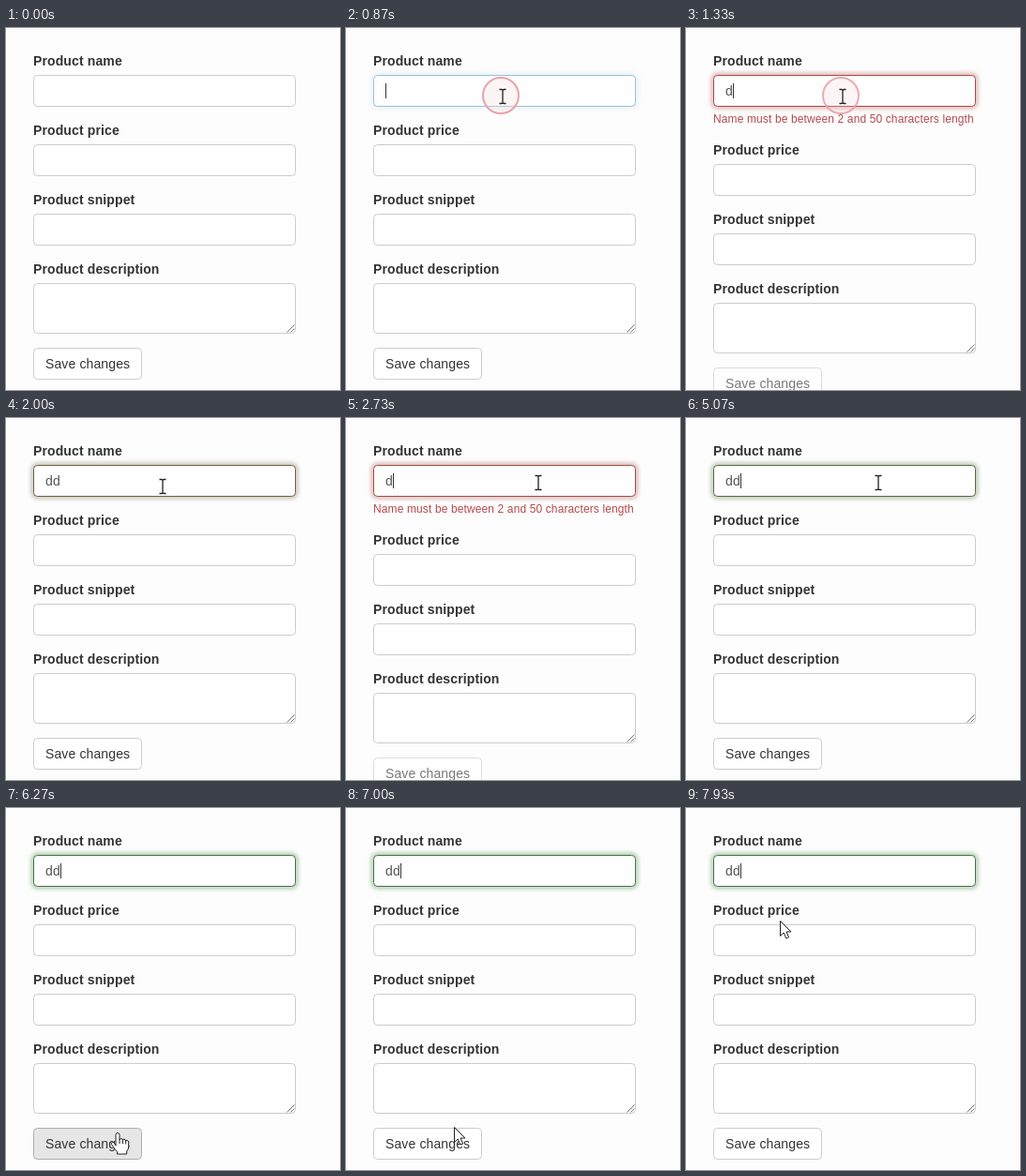
Animation of 356x386 px, one loop 8000 ms. Source, as an HTML page:

```html
<!DOCTYPE html>
<html lang="en">
<head>
<meta charset="utf-8">
<title>Product form</title>
<style>
  html, body { margin: 0; width: 100%; height: 100%; overflow: hidden; background: #fcfdfc; }
  svg { display: block; width: 100vw; height: 100vh; }
  text { font: 14px "Liberation Sans", Arial, sans-serif; letter-spacing: .12px; fill: #333; white-space: pre; }
  .label { font-weight: bold; }
  .field { fill: #fdfefd; stroke: #ccc; }
  #value { fill: #555; }
  #error { font-size: 12px; fill: #b5494b; }
  .arrow, .hand { fill: #fff; stroke: #222; stroke-linejoin: round; }
  .beam { fill: none; stroke: #222; stroke-width: 1.3; }
</style>
</head>
<body>
<svg viewBox="0 0 356 386">
  <defs>
    <filter id="blur" x="-10%" y="-50%" width="120%" height="200%"><feGaussianBlur stdDeviation="2"/></filter>
  </defs>
  <text class="label" x="29" y="40">Product name</text>
  <rect id="glow" x="28.5" y="49.5" width="281" height="35" rx="5" fill="none" stroke-width="3" filter="url(#blur)"/>
  <rect id="name" class="field" x="29.5" y="50.5" width="279" height="33" rx="4"/>
  <text id="value" x="42" y="72"></text>
  <path id="caret" d="M0 59V75" stroke="#333"/>
  <text id="error" x="29" y="101"></text>
  <g id="rest">
    <text class="label" x="29" y="114">Product price</text>
    <rect class="field" x="29.5" y="124.5" width="279" height="33" rx="4"/>
    <text class="label" x="29" y="188">Product snippet</text>
    <rect class="field" x="29.5" y="198.5" width="279" height="33" rx="4"/>
    <text class="label" x="29" y="262">Product description</text>
    <rect class="field" x="29.5" y="272.5" width="279" height="53" rx="4"/>
    <path d="M299.5 324.5l8-8M303.5 324.5l4-4" stroke="#777"/>
    <g id="button">
      <rect id="face" x="29.5" y="341.5" width="115" height="33" rx="4"/>
      <text x="42" y="363">Save changes</text>
    </g>
  </g>
  <circle id="ring" cx="165" cy="72" r="19" fill="#f6d5d8" fill-opacity=".25" stroke="#e9a3ab" stroke-width="2"/>
  <g id="cursor">
    <path class="arrow" d="M.5 .5V16.5L4.2 13l2.6 6 2.8-1.2L7 12h5z"/>
    <path class="beam" d="M-3.5-7.5h2Q0-7.5 0-6.3 0-7.5 1.5-7.5h2M0-6.5V6.5M-3.5 7.5h2Q0 7.5 0 6.3 0 7.5 1.5 7.5h2"/>
    <g class="hand">
      <path d="M-2 13V1.5Q-2-.5 0-.5T2 1.5V7Q2 5.5 3.7 5.5T5.4 7.2Q5.7 6.2 7 6.2T8.7 8Q9 7.2 10.2 7.4T11.7 9.3V14Q11.7 17 9.7 19V22H-.5V19.5Q-2.5 18-4.5 14.5L-6.6 11.5Q-7 10-5.7 9.5T-3.4 10.8z"/>
      <path d="M2 7v4M5.4 7.2v4M8.7 8v3.5" fill="none"/>
    </g>
  </g>
</svg>
<script>
const LOOP = 8000, BLINK = 510, ERROR_SHIFT = 21;
const $ = id => document.getElementById(id);
const clamp = v => Math.min(1, Math.max(0, v));

const BORDER = { idle: [204, 204, 204], focus: [102, 175, 233], bad: [176, 68, 70], good: [60, 118, 61] };
const TOO_SHORT = "Name must be between 2 and 50 characters length";
const REQUIRED = "Name is required";

// Each edit: start, typed text, border state, border fade time, message
const edits = [
  [0, "", "idle", 1, ""],
  [800, "", "focus", 150, ""],
  [1130, "d", "bad", 150, TOO_SHORT],
  [1470, "dd", "good", 1000, ""],
  [2600, "d", "bad", 150, TOO_SHORT],
  [3725, "", "bad", 1, REQUIRED],
  [4600, "d", "bad", 1, TOO_SHORT],
  [4860, "dd", "good", 270, ""]
];

// Pointer stops: time, x, y
const stops = [
  [100, 151, 104], [400, 151, 104], [730, 167, 73], [2000, 167, 73],
  [2200, 217, 71], [2400, 217, 71], [2530, 205, 69], [5330, 205, 69],
  [6130, 119, 347], [6270, 119, 347], [6500, 117, 358], [6650, 117, 358],
  [7000, 115, 340], [7800, 100, 120]
];

function pointerAt(t) {
  const i = stops.findIndex(s => s[0] > t);
  if (i < 0) return stops[stops.length - 1].slice(1);
  if (i === 0) return stops[0].slice(1);
  const [t0, x0, y0] = stops[i - 1], [t1, x1, y1] = stops[i];
  const p = (t - t0) / (t1 - t0), e = p * p * (3 - 2 * p);
  return [x0 + (x1 - x0) * e, y0 + (y1 - y0) * e];
}

function shapeAt(x, y) {
  const within = (top, bottom) => y >= top && y < bottom;
  if (within(341, 375) && x < 145) return 2;
  return [[50, 84], [124, 158], [198, 232], [272, 326]].some(r => within(...r)) ? 1 : 0;
}

const mix = (a, b, p) => `rgb(${a.map((v, i) => Math.round(v + (b[i] - v) * p))})`;

function drawField(t) {
  const i = edits.findLastIndex(e => e[0] <= t);
  const [start, text, state, fade, message] = edits[i];
  const before = edits[Math.max(0, i - 1)][2];
  const p = clamp((t - start) / fade);
  const color = mix(BORDER[before], BORDER[state], p);

  $("name").style.stroke = color;
  $("glow").setAttribute("stroke", color);
  $("glow").setAttribute("opacity", i === 0 ? 0 : before === "idle" ? .5 * p : .5);
  $("value").textContent = text;
  $("error").textContent = message;
  $("rest").setAttribute("transform", `translate(0 ${message ? ERROR_SHIFT : 0})`);
  $("button").setAttribute("opacity", message ? .65 : 1);

  const lit = i > 0 && Math.floor((t - start) / BLINK) % 2 === 0;
  $("caret").setAttribute("visibility", lit ? "visible" : "hidden");
  $("caret").setAttribute("transform", `translate(${42.5 + text.length * 8} 0)`);
}

function drawPointer(t) {
  const [x, y] = pointerAt(t), shape = shapeAt(x, y);
  const cursor = $("cursor");
  cursor.setAttribute("visibility", t < 100 ? "hidden" : "visible");
  cursor.setAttribute("transform", `translate(${Math.round(x)} ${Math.round(y)})`);
  [...cursor.children].forEach((el, i) => el.style.display = i === shape ? "" : "none");
  $("face").setAttribute("fill", shape === 2 ? "#e6e6e6" : "#fff");
  $("face").setAttribute("stroke", shape === 2 ? "#adadad" : "#ccc");
  $("ring").setAttribute("opacity", t < 800 ? 0 : clamp((1600 - t) / 300));
}

function render(t) {
  drawField(t);
  drawPointer(t);
}

const begin = performance.now();
function tick() {
  render((performance.now() - begin) % LOOP);
  requestAnimationFrame(tick);
}
tick();
</script>
</body>
</html>
```
